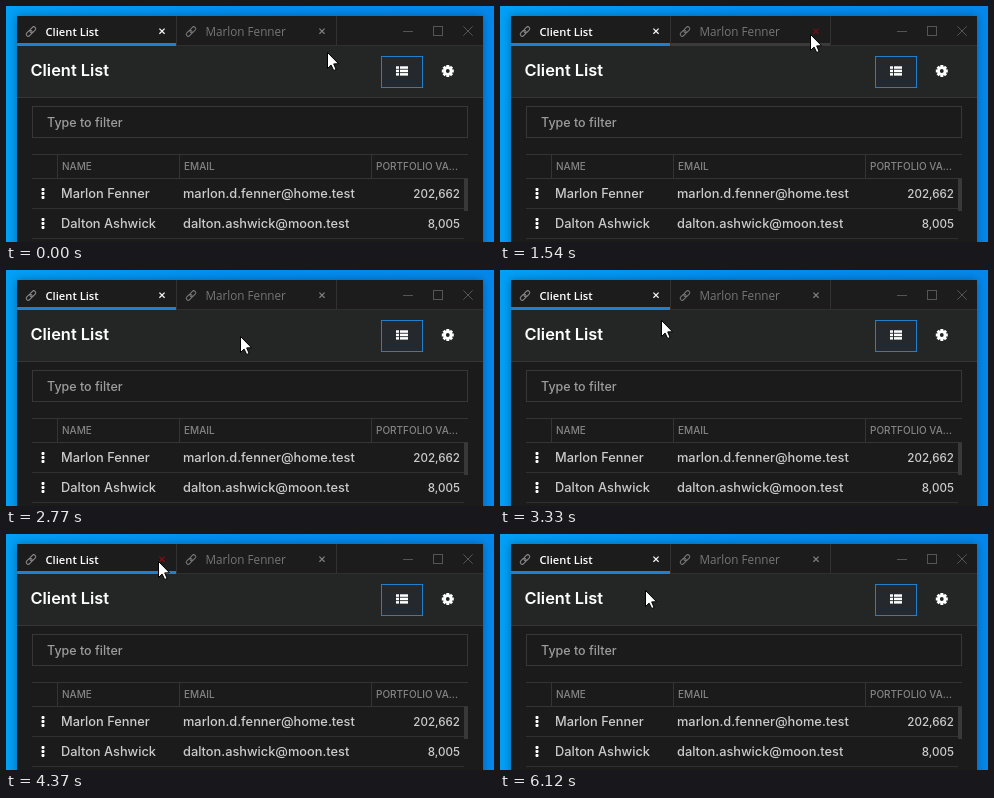
An HTML page with a canvas for the animation above (7.18 s loop, 488 px wide and 236 px high).

```html
<!DOCTYPE html>
<html lang="en">
<head>
<meta charset="utf-8">
<title>Client list</title>
<style>
  html, body { margin: 0; width: 100%; height: 100%; overflow: hidden; background: #1a1a1a; }
  canvas { display: block; width: 488px; height: 236px; }
</style>
</head>
<body>
<canvas id="stage"></canvas>
<script>
const W = 488, H = 236, LOOP = 7180, STEP = 70;
const UI = '"Open Sans", sans-serif', BODY = 'Inter, sans-serif';
const canvas = document.getElementById('stage');
const ctx = canvas.getContext('2d');
const dpr = window.devicePixelRatio || 1;
canvas.width = W * dpr;
canvas.height = H * dpr;

// Pointer path: time, x, y
const path = [
  [0, 322, 46], [450, 322, 46], [790, 316, 33], [1000, 311, 28], [2210, 311, 28],
  [2280, 310, 27], [2490, 292, 45], [2630, 266, 60], [2770, 235, 66], [2980, 178, 65],
  [3260, 163, 54], [3540, 158, 38], [3750, 156, 32], [3890, 155, 30], [4370, 153, 27],
  [5500, 153, 27], [5810, 150, 43], [6120, 146, 56], [LOOP, 146, 56]
];

const rows = [
  { y: 187.5, name: 'Marlon Fenner', email: 'marlon.d.fenner@home.test', value: '202,662' },
  { y: 217.5, name: 'Dalton Ashwick', email: 'dalton.ashwick@moon.test', value: '8,005' }
];

function pointerAt(t) {
  let i = 0;
  while (i < path.length - 2 && t >= path[i + 1][0]) i++;
  const [t0, x0, y0] = path[i], [t1, x1, y1] = path[i + 1];
  const k = Math.floor((t - t0) / STEP) * STEP / (t1 - t0);
  return { x: Math.round(x0 + (x1 - x0) * k), y: Math.round(y0 + (y1 - y0) * k) };
}

function rect(x, y, w, h, color) {
  ctx.fillStyle = color;
  ctx.fillRect(x, y, w, h);
}

function frame(x, y, w, h, color) {
  ctx.strokeStyle = color;
  ctx.lineWidth = 1;
  ctx.strokeRect(x + 0.5, y + 0.5, w - 1, h - 1);
}

function text(str, x, y, font, color, align = 'left') {
  ctx.font = font;
  ctx.fillStyle = color;
  ctx.textAlign = align;
  ctx.fillText(str, x, y);
}

function cross(x, y, r, color, width) {
  ctx.strokeStyle = color;
  ctx.lineWidth = width;
  ctx.beginPath();
  ctx.moveTo(x - r, y - r);
  ctx.lineTo(x + r, y + r);
  ctx.moveTo(x + r, y - r);
  ctx.lineTo(x - r, y + r);
  ctx.stroke();
}

function chain(x, y, color) {
  ctx.save();
  ctx.translate(x, y);
  ctx.rotate(-Math.PI / 4);
  ctx.strokeStyle = color;
  ctx.lineWidth = 1;
  for (const left of [-5.9, -0.9]) {
    ctx.beginPath();
    ctx.roundRect(left, -2, 6.8, 4, 2);
    ctx.stroke();
  }
  ctx.restore();
}

function gear(x, y) {
  ctx.save();
  ctx.translate(x, y);
  ctx.fillStyle = '#fff';
  for (let i = 0; i < 4; i++) {
    ctx.fillRect(-1.5, -6, 3, 12);
    ctx.rotate(Math.PI / 4);
  }
  ctx.beginPath();
  ctx.arc(0, 0, 4.7, 0, Math.PI * 2);
  ctx.fill();
  ctx.beginPath();
  ctx.arc(0, 0, 1.9, 0, Math.PI * 2);
  ctx.fillStyle = '#242525';
  ctx.fill();
  ctx.restore();
}

function desktop() {
  const g = ctx.createLinearGradient(0, 0, W, 0);
  g.addColorStop(0, '#02a0f8');
  g.addColorStop(0.5, '#028ef2');
  g.addColorStop(1, '#0488ec');
  rect(0, 0, W, H, g);
  ctx.save();
  ctx.shadowColor = 'rgba(0, 0, 0, 0.35)';
  ctx.shadowBlur = 9 * dpr;
  rect(11, 10, 466, 240, '#1b1b1b');
  ctx.restore();
}

function tabs(p) {
  const inTabs = p.y < 40, onClose = p.y < 29;
  rect(11, 10, 466, 30, '#1c1c1c');
  rect(170, 10, 1, 30, '#323232');
  rect(330, 10, 1, 30, '#323232');
  rect(171, 39, 306, 1, '#303030');
  if (inTabs && p.x > 170 && p.x < 330) rect(171, 37, 159, 3, '#3b3b3b');
  rect(11, 37, 159, 3, '#2080cd');

  chain(25, 25.5, '#8d8d8d');
  text('Client List', 39.5, 30, '600 11.2px ' + UI, '#fff');
  cross(156, 25.2, 2.6, onClose && p.x < 170 ? '#860c12' : '#f2f2f2', 1.3);

  chain(185, 25.5, '#7a7a7a');
  text('Marlon Fenner', 199.5, 30, '11.7px ' + UI, '#757575');
  cross(316, 25.2, 2.6, onClose && p.x > 170 ? '#6e0f16' : '#7d7d7d', 1.3);

  rect(397, 25, 10, 1, '#555');
  frame(427, 20, 10, 10, '#555');
  cross(462, 25, 4.7, '#555', 1);
}

function header() {
  rect(11, 40, 466, 51, '#242525');
  rect(11, 91, 466, 1, '#363636');
  text('Client List', 24.5, 70, '600 16.4px ' + BODY, '#fff');
  rect(375, 50, 42, 32, '#25292d');
  frame(375, 50, 42, 32, '#2080cd');
  for (const y of [60.3, 63.7, 67.1]) {
    rect(390, y, 3, 2.5, '#fff');
    rect(394, y, 8, 2.5, '#fff');
  }
  gear(441.8, 65);
}

function table() {
  rect(11, 92, 466, 144, '#1b1b1b');
  frame(26, 100, 436, 32, '#373737');
  text('Type to filter', 41, 120.5, '500 12.5px ' + BODY, '#9c9c9c');

  rect(26, 148, 436, 1, '#343434');
  rect(26, 172, 436, 1, '#343434');
  for (const x of [51, 173, 365]) rect(x, 149, 1, 23, '#343434');
  const head = '500 10px ' + BODY;
  text('NAME', 56, 164, head, '#858585');
  text('EMAIL', 178, 164, head, '#858585');
  text('PORTFOLIO VA...', 370, 164, head, '#858585');

  const cell = '500 12.8px ' + BODY, ink = '#cbcbcb';
  for (const row of rows) {
    for (const d of [-4, 0, 4]) {
      ctx.beginPath();
      ctx.roundRect(35.5, row.y + d - 1.4, 3, 2.8, 0.8);
      ctx.fillStyle = '#fff';
      ctx.fill();
    }
    const base = row.y + 4.5;
    text(row.name, 55, base, cell, ink);
    text(row.email, 177, base, cell, ink);
    text(row.value, 454, base, '500 11.6px ' + BODY, ink, 'right');
    rect(26, row.y + 14.5, 432, 1, '#313131');
  }
  rect(458, 173, 4, 32, '#393939');
}

function pointer(p) {
  ctx.save();
  ctx.translate(p.x - 0.5, p.y + 0.5);
  ctx.beginPath();
  ctx.moveTo(0, 0);
  ctx.lineTo(0, 16);
  ctx.lineTo(3.6, 12.6);
  ctx.lineTo(6.2, 18);
  ctx.lineTo(8.6, 17);
  ctx.lineTo(6.2, 11.4);
  ctx.lineTo(11, 11.2);
  ctx.closePath();
  ctx.fillStyle = '#fff';
  ctx.fill();
  ctx.strokeStyle = '#000';
  ctx.lineWidth = 1;
  ctx.stroke();
  ctx.restore();
}

function draw(t) {
  const p = pointerAt(t);
  ctx.setTransform(dpr, 0, 0, dpr, 0, 0);
  desktop();
  tabs(p);
  header();
  table();
  pointer(p);
}

const start = performance.now();
function tick() {
  draw((performance.now() - start) % LOOP);
  requestAnimationFrame(tick);
}
tick();
</script>
</body>
</html>
```
